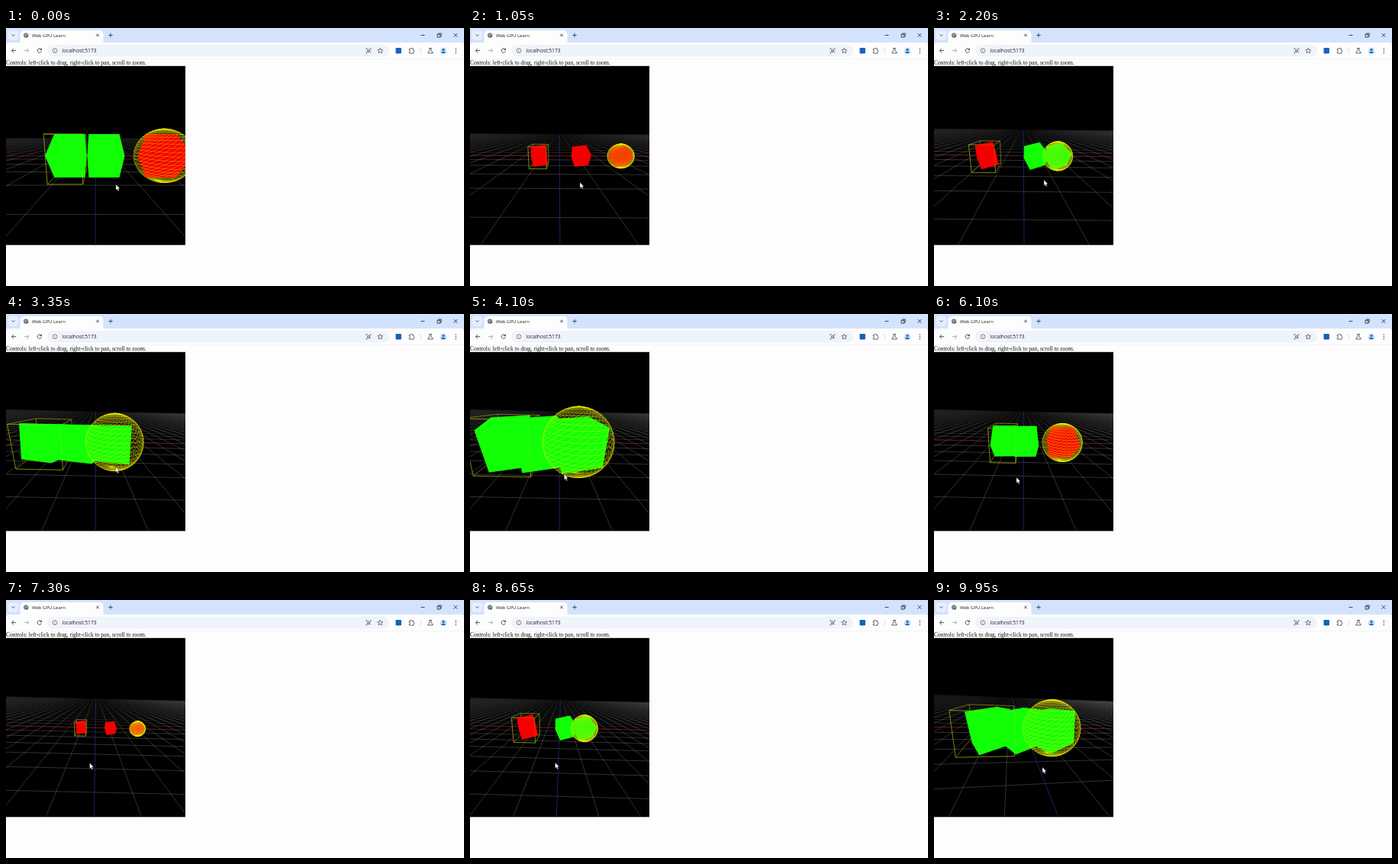
Recreate the animation shown at these times as an HTML page with a canvas. Size 600x338 px, loop 10000 ms.

```html
<!DOCTYPE html>
<html lang="en">
<head>
<meta charset="utf-8">
<title>Web GPU Learn</title>
<style>
html, body { margin: 0; width: 100%; height: 100%; overflow: hidden; background: #fdfdfd; }
canvas { display: block; width: 600px; height: 338px; }
</style>
</head>
<body>
<canvas id="stage"></canvas>
<script>
const canvas = document.getElementById('stage');
const ctx = canvas.getContext('2d');
const ratio = Math.max(1, window.devicePixelRatio || 1);
canvas.width = 600 * ratio;
canvas.height = 338 * ratio;

const LOOP = 10000, FOCAL = 153, NEAR = 0.15, GRID = 50;
const VIEW = { x: 0, y: 49.6, size: 235 };
const CENTER = { x: 117.2, y: 167.4 };
const GREEN = '#12ff08', RED = '#f40000';

// time, camera distance, slope, yaw, roll, left/mid/right offsets, size offset, rotation x/y/z, pointer x/y
const KEYS = [
  [0, 6.6, .17, 0, 0, -2.38, -.43, 2.79, .25, .62, 0, 0, 144, 205],
  [2.2, 7.1, .255, .005, .012, -2.36, .55, 1.9, -.18, .59, .32, .2, 144, 199],
  [3.35, 7.75, .3, .007, .024, -2.1, .17, 2.27, -.18, -.17, -.29, .05, 143.5, 200],
  [4.8, 7.75, .3, .007, .024, -1.8, -.13, 2.48, -.13, .47, .66, .09, 104.5, 219],
  [6.1, 7.75, .3, .007, .024, -1.96, -.64, 1.77, -.13, .72, .04, .02, 108, 214],
  [8.65, 10, .285, -.002, .026, -2.68, .55, 2.16, -.06, .59, .32, .18, 111.5, 213],
  [9.95, 7.75, .295, .125, .045, -.98, 1.02, 3.05, -.37, 0, .46, .13, 142, 219]
];

let cam;

function poseAt(t) {
  let i = 0;
  while (i < KEYS.length - 2 && t > KEYS[i + 1][0]) i++;
  const a = KEYS[i], b = KEYS[i + 1];
  const k = Math.min(1, (t - a[0]) / (b[0] - a[0]));
  const [, dist, slope, yaw, roll, left, mid, right, grow, rx, ry, rz, mx, my] =
    a.map((v, n) => v + (b[n] - v) * k);
  const sway = 1.25 * Math.cos(t - .75);
  const radius = 1.55 + .9 * Math.cos(t - 4.35) + grow;
  return {
    dist, yaw, roll, pitch: Math.atan(slope), slope, radius, side: radius * 1.155,
    left: sway + left, mid: sway + mid, right: sway + right,
    rot: [rx, ry, rz], pointer: [mx, my]
  };
}

function spin(a, b, angle) {
  const c = Math.cos(angle), s = Math.sin(angle);
  return [a * c - b * s, a * s + b * c];
}

function rotate([x, y, z], [rx, ry, rz]) {
  [y, z] = spin(y, z, rx);
  [z, x] = spin(z, x, ry);
  [x, y] = spin(x, y, rz);
  return [x, y, z];
}

function toCamera([x, y, z]) {
  [z, x] = spin(z, x, cam.yaw);
  [y, z] = spin(y, z, cam.pitch);
  return [x, y, cam.dist - z];
}

function toScreen([x, y, depth]) {
  const k = FOCAL / depth;
  const [sx, sy] = spin(x * k, -y * k, cam.roll);
  return [CENTER.x + sx, CENTER.y + sy];
}

const project = p => toScreen(toCamera(p));

function clipTo(a, b) {
  const k = (NEAR - a[2]) / (b[2] - a[2]);
  return a.map((v, i) => v + (b[i] - v) * k);
}

function segment(p, q) {
  let a = toCamera(p), b = toCamera(q);
  if (a[2] < NEAR && b[2] < NEAR) return;
  if (a[2] < NEAR) a = clipTo(a, b);
  if (b[2] < NEAR) b = clipTo(b, a);
  ctx.moveTo(...toScreen(a));
  ctx.lineTo(...toScreen(b));
}

function stroke(color, width, build) {
  ctx.strokeStyle = color;
  ctx.lineWidth = width;
  ctx.beginPath();
  build();
  ctx.stroke();
}

function drawGrid() {
  for (let i = -GRID; i <= GRID; i++) {
    const depth = Math.max(1, cam.dist - i);
    stroke(`rgba(165,165,165,${.5 * Math.min(1, 7 / depth)})`, .6,
      () => segment([-GRID, 0, i], [GRID, 0, i]));
  }
  stroke('rgba(165,165,165,.5)', .6, () => {
    for (let i = -GRID; i <= GRID; i++) if (i) segment([i, 0, -GRID], [i, 0, GRID]);
  });
  const horizon = CENTER.y - FOCAL * cam.slope;
  const fade = ctx.createLinearGradient(0, horizon, 0, horizon + 34);
  fade.addColorStop(0, 'rgba(0,0,0,.95)');
  fade.addColorStop(.3, 'rgba(0,0,0,.6)');
  fade.addColorStop(1, 'rgba(0,0,0,0)');
  ctx.fillStyle = fade;
  ctx.fillRect(0, horizon - 6, VIEW.size, 40);
  stroke('#7c1014', .7, () => segment([-GRID, 0, 0], [GRID, 0, 0]));
  stroke('#282888', .8, () => segment([0, 0, -GRID], [0, 0, GRID]));
}

const CORNERS = Array.from({ length: 8 }, (_, i) => [i & 1 ? 1 : -1, i & 2 ? 1 : -1, i & 4 ? 1 : -1]);
const FACES = [[0, 1, 3, 2], [4, 5, 7, 6], [0, 1, 5, 4], [2, 3, 7, 6], [0, 2, 6, 4], [1, 3, 7, 5]];

function cubeCorners(x) {
  return CORNERS.map(c => {
    const p = rotate(c.map(v => v * cam.side / 2), cam.rot);
    return [p[0] + x, p[1], p[2]];
  });
}

function drawCube(x, color) {
  const points = cubeCorners(x).map(project);
  ctx.fillStyle = color;
  ctx.strokeStyle = color;
  ctx.lineWidth = .3;
  for (const face of FACES) {
    ctx.beginPath();
    face.forEach(i => ctx.lineTo(...points[i]));
    ctx.closePath();
    ctx.fill();
    ctx.stroke();
  }
}

function drawBounds(x, frontOnly) {
  const corners = cubeCorners(x);
  const half = [0, 1, 2].map(n => Math.max(...corners.map(c => Math.abs(c[n] - (n ? 0 : x)))));
  const box = CORNERS.map(c => [x + c[0] * half[0], c[1] * half[1], c[2] * half[2]]);
  stroke(frontOnly ? 'rgba(220,220,20,.3)' : '#a0a018', .65, () => {
    for (let i = frontOnly ? 4 : 0; i < 8; i++)
      for (const bit of [1, 2, 4])
        if (!(i & bit)) segment(box[i], box[i | bit]);
  });
}

function drawSphere(x, front) {
  const rows = 24, cols = 32;
  const point = (r, c) => {
    const a = Math.PI * r / rows, b = 2 * Math.PI * c / cols, ring = Math.sin(a) * cam.radius;
    return [x + ring * Math.cos(b), Math.cos(a) * cam.radius, ring * Math.sin(b)];
  };
  stroke(front ? 'rgba(244,244,0,.8)' : 'rgba(244,244,0,.7)', .42, () => {
    for (let r = 0; r < rows; r++) {
      for (let c = 0; c < cols; c++) {
        const p = point(r, c);
        if ((toCamera(p)[2] < cam.dist) !== front) continue;
        segment(p, point(r, c + 1));
        segment(p, point(r + 1, c + 1));
      }
    }
  });
}

function drawScene() {
  ctx.save();
  ctx.beginPath();
  ctx.rect(VIEW.x, VIEW.y, VIEW.size, VIEW.size);
  ctx.clip();
  ctx.fillStyle = '#000';
  ctx.fillRect(VIEW.x, VIEW.y, VIEW.size, VIEW.size);
  drawGrid();
  const hitLeft = cam.mid - cam.left < cam.side * 1.5;
  const hitRight = cam.right - cam.mid < cam.side * 1.48;
  const tint = hit => hit ? GREEN : RED;
  drawBounds(cam.left, false);
  drawSphere(cam.right, false);
  drawCube(cam.left, tint(hitLeft));
  drawCube(cam.right, tint(hitRight));
  drawCube(cam.mid, tint(hitLeft || hitRight));
  drawBounds(cam.left, true);
  drawSphere(cam.right, true);
  ctx.restore();
}

function pill(x, y, w, h, r, color) {
  ctx.fillStyle = color;
  ctx.beginPath();
  ctx.roundRect(x, y, w, h, r);
  ctx.fill();
}

function label(text, x, y, font, color) {
  ctx.font = font;
  ctx.fillStyle = color;
  ctx.fillText(text, x, y);
}

function icon(path, width = .9, color = '#3c4043') {
  ctx.strokeStyle = color;
  ctx.lineWidth = width;
  ctx.stroke(new Path2D(path));
}

function dot(x, y, r, color) {
  ctx.fillStyle = color;
  ctx.beginPath();
  ctx.arc(x, y, r, 0, 7);
  ctx.fill();
}

function drawBrowser() {
  ctx.fillStyle = '#fdfdfd';
  ctx.fillRect(0, 0, 600, 338);
  ctx.fillStyle = '#d3e3fd';
  ctx.fillRect(0, 0, 600, 24);
  pill(0, 19, 600, 22, [4, 4, 0, 0], '#fdfdfd');
  pill(18.5, 3, 109, 20, [5, 5, 0, 0], '#fdfdfd');
  pill(3, 3, 13, 13, 4, '#e6effd');
  icon('M7.5 8.5l2 2 2-2');
  dot(26.3, 9.6, 3.2, '#5f6368');
  icon('M24 8.3l2 1.2-.5 2M27 7l1 2 1 .5', .8, '#fdfdfd');
  label('Web GPU Learn', 34, 12, '6px "Open Sans", sans-serif', '#1f1f1f');
  icon('M118.2 7.7l3.6 3.6M121.8 7.7l-3.6 3.6M134.3 9.5h5.4M137 6.8v5.4');
  icon('M543.5 9.5h5M565 8.3h3.8v3.8H565zM566.4 8.2V7h3.8v3.9H569M586.6 7l4.8 4.8M591.4 7l-4.8 4.8', .8, '#222');

  pill(54, 22, 448, 15.5, 7.75, '#eff3fa');
  icon('M13.3 29.6H7.5M10 27l-2.6 2.6 2.6 2.6');
  icon('M24 29.6h5.8M27.3 27l2.6 2.6-2.6 2.6', .9, '#a5a8ac');
  icon('M46 28a2.7 2.7 0 1 0 .4 2.5M46.5 26.5v2.2h-2.2');
  dot(64, 29.7, 5.2, '#fdfdfd');
  icon('M67 29.7a3 3 0 1 1-6 0a3 3 0 1 1 6 0M64 29.3v2M64 27.8v.7', .7);
  label('localhost:5173', 73.5, 32, '6.7px "Open Sans", sans-serif', '#1f1f1f');
  icon('M472.2 28.2v-1.3h1.3M476.6 26.9h1.3v1.3M472.2 31.5v1.3h1.3M478 32.5l-1-1M476.6 30a1.5 1.5 0 1 1-3 0a1.5 1.5 0 1 1 3 0');
  icon('M490.3 26.2l1 2.3 2.5.2-1.9 1.6.6 2.5-2.2-1.3-2.2 1.3.6-2.5-1.9-1.6 2.5-.2z', .7);
  pill(510.5, 26, 7.4, 7.4, .8, '#1763b6');
  icon('M528.3 27.5h1.7a1.2 1.2 0 0 1 2.4 0h1.6v1.8a1.2 1.2 0 0 1 0 2.3v1.5h-5.7v-1.7a1.1 1.1 0 0 0 0-2.2z', .8);
  icon('M543.3 26v8', .7, '#c5d9f8');
  icon('M555 26.6v2.6l-2.4 3.7h6.8l-2.4-3.7v-2.6M554.2 26.5h3.6', .8);
  dot(573, 29.8, 4.4, '#c9defa');
  dot(573, 28.4, 1.6, '#1a73c8');
  pill(570.2, 30.7, 5.6, 2.3, [2, 2, 0, 0], '#1a73c8');
  for (const y of [27, 29.7, 32.4]) dot(589.3, y, .75, '#3c4043');
  ctx.fillStyle = '#e3e9f2';
  ctx.fillRect(0, 40.4, 600, .5);
  label('Controls: left-click to drag, right-click to pan, scroll to zoom.', 0, 47.7,
    '7.5px "Liberation Serif", serif', '#111');
}

function drawPointer([x, y]) {
  const arrow = new Path2D('M0 0V7.5L1.7 6 2.9 8.7 4.2 8.1 3 5.5H5.3Z');
  ctx.save();
  ctx.translate(x, y);
  ctx.fillStyle = '#fff';
  ctx.fill(arrow);
  ctx.strokeStyle = '#222';
  ctx.lineWidth = .4;
  ctx.stroke(arrow);
  ctx.restore();
}

function render(now) {
  cam = poseAt((now % LOOP) / 1000);
  ctx.setTransform(ratio, 0, 0, ratio, 0, 0);
  drawBrowser();
  drawScene();
  drawPointer(cam.pointer);
  requestAnimationFrame(render);
}

render(0);
</script>
</body>
</html>
```
